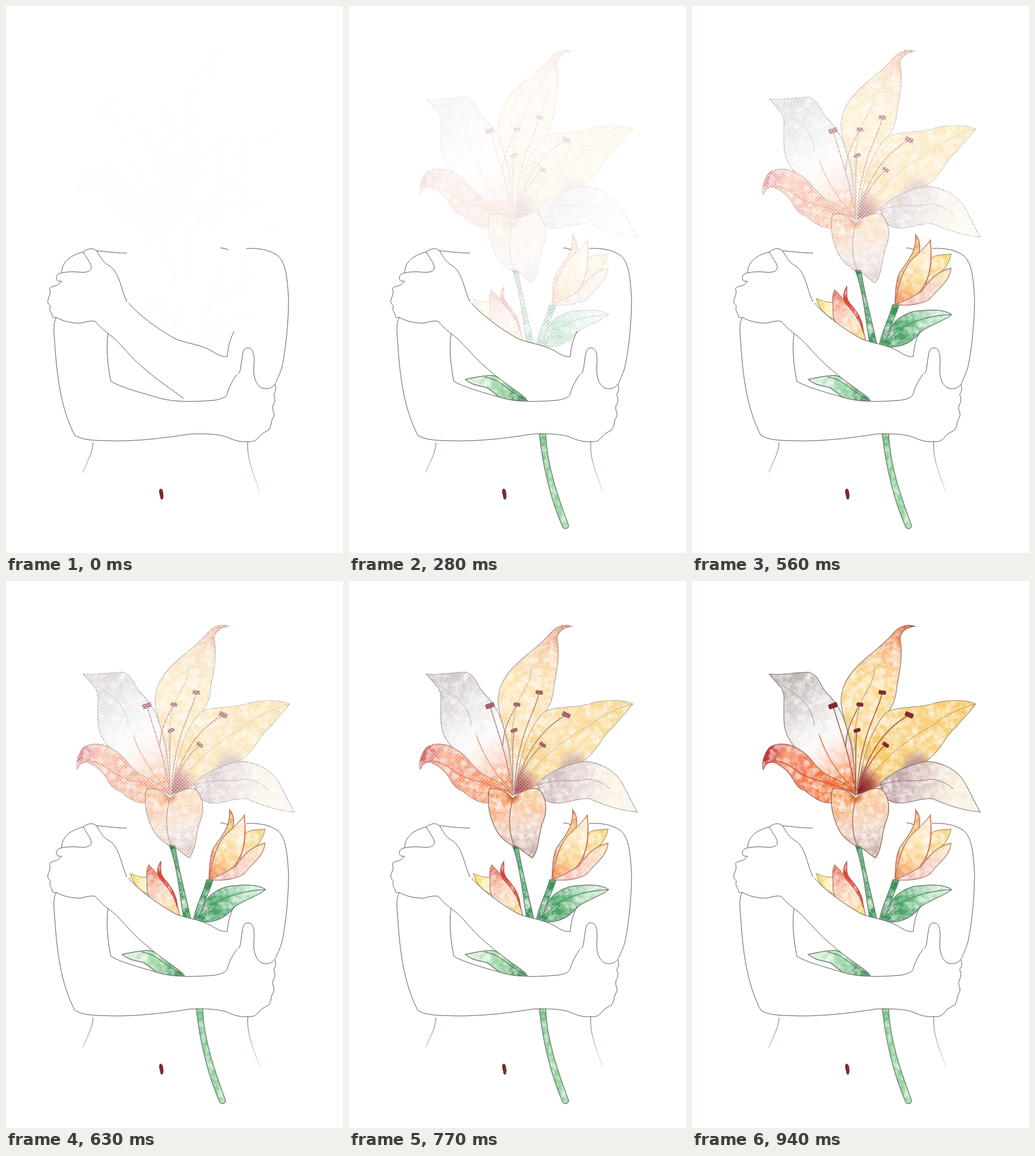
Animation, 588 px wide and 952 px high, one loop 1.64 s. Source, as an HTML page with a canvas:

```html
<!DOCTYPE html>
<html lang="en">
<head>
<meta charset="utf-8">
<title>Lily embrace</title>
<style>
html, body { margin: 0; width: 100%; height: 100%; overflow: hidden; background: #fff; }
canvas { display: block; }
</style>
</head>
<body>
<canvas id="stage" width="588" height="952"></canvas>
<script>
const W = 588, H = 952;
const ctx = document.getElementById('stage').getContext('2d');

function sheet(w = W, h = H) {
  const c = document.createElement('canvas');
  c.width = w;
  c.height = h;
  return c.getContext('2d');
}

let seed = 11;
const rnd = () => (seed = seed * 16807 % 2147483647) / 2147483647;

// Mottled watercolour: small translucent triangles
const mottle = sheet();
for (let i = 0; i < 9000; i++) {
  const x = 110 + rnd() * 405, y = 70 + rnd() * 850, r = 4 + rnd() * 6, a = rnd() * 6.3;
  mottle.fillStyle = rnd() < .7 ? 'rgba(255,255,255,.24)' : 'rgba(170,110,80,.025)';
  mottle.beginPath();
  for (let j = 0; j < 3; j++) mottle.lineTo(x + r * Math.cos(a + j * 2.1), y + r * Math.sin(a + j * 2.1));
  mottle.fill();
}

// Canvas weave that eats into half-faded paint
const weave = sheet(6, 6);
weave.fillRect(0, 0, 4, 2);
weave.fillRect(3, 3, 3, 2);
weave.fillRect(0, 3, 1, 2);
const grain = ctx.createPattern(weave.canvas, 'repeat');

function line(g, d, color, width = 1) {
  g.strokeStyle = color;
  g.lineWidth = width;
  g.stroke(new Path2D(d));
}

// axis: x1 y1 x2 y2 of the colour run
function shape(g, d, axis, colors, edge = '#8d8078', width = 1.3) {
  const p = new Path2D(d), run = g.createLinearGradient(...axis);
  colors.forEach((c, i) => run.addColorStop(i / (colors.length - 1), c));
  g.save();
  g.clip(p);
  g.fillStyle = run;
  g.fillRect(0, 0, W, H);
  g.drawImage(mottle.canvas, 0, 0);
  g.restore();
  line(g, d, edge, width);
}

function glow(g, d, x, y, r, color) {
  const run = g.createRadialGradient(x, y, 0, x, y, r);
  run.addColorStop(0, color);
  run.addColorStop(.45, color + 'b0');
  run.addColorStop(1, color + '00');
  g.save();
  g.clip(new Path2D(d));
  g.fillStyle = run;
  g.fillRect(x - r, y - r, 2 * r, 2 * r);
  g.restore();
}

const low = sheet(), mid = sheet(), base = sheet(), bloom = sheet();
const moss = '#6c8274';

// Lower stem and leaf
shape(low, 'M332 744L343 744C345 800 365 855 383 904C383 910 376 911 373 907C352 860 338 800 332 744Z',
  [335, 745, 380, 910], ['#6fbf80', '#92d49c', '#8ed09a'], '#7b9282', 1.8);
shape(low, 'M203 650C220 646 235 643 250 643C265 645 285 665 312 687L285 688C260 685 255 672 240 664C225 660 215 660 203 650Z',
  [203, 650, 312, 688], ['#e2f4e2', '#a0d9a8', '#1f8243'], moss, 1.6);
line(low, 'M237 646C263 649 275 668 310 687', '#4d8660', 1.4);

// Upper stems, right leaf and buds
shape(mid, 'M285 460L295 460C300 500 315 550 323 592L311 592C303 550 300 500 285 460Z',
  [290, 460, 316, 590], ['#1f8844', '#50a96c', '#3c9b5a'], moss, 1.5);
shape(mid, 'M350 520L361 521C354 545 340 565 338 592L327 590C331 565 344 545 350 520Z',
  [355, 520, 332, 590], ['#2f9150', '#45a563', '#3c9b5a'], moss, 1.5);
shape(mid, 'M453 537C440 527 410 528 385 532C360 540 345 555 345 570L330 592C360 597 380 590 400 566C420 553 440 548 453 537Z',
  [335, 590, 453, 535], ['#2a8f50', '#56ad72', '#a5d8b3', '#eef8ee'], moss, 1.5);
line(mid, 'M337 588C358 562 385 541 453 537', '#4d8b65', 1.3);

shape(mid, 'M452 432C440 433 425 432 416 440L408 487C430 470 448 455 452 432Z',
  [452, 432, 408, 485], ['#f8d468', '#fbdc92', '#f9cd8e'], '#a8936c');
shape(mid, 'M452 456C430 462 420 470 400 497L355 520C375 522 400 520 415 510C430 490 450 480 452 456Z',
  [452, 456, 370, 520], ['#fbe3a4', '#f8d6cb', '#f5b9b4'], '#a87d70');
shape(mid, 'M390 398C400 410 399 425 392 440C375 470 375 500 354 520C355 500 355 480 362 465C375 445 392 430 390 398Z',
  [390, 398, 358, 518], ['#f29a4e', '#fbd091', '#f2966c', '#e84a3a'], '#a96f55');
shape(mid, 'M416 407C418 440 420 470 398 497C385 508 365 515 354 520C360 490 365 465 380 445C395 430 408 420 416 407Z',
  [416, 407, 356, 520], ['#fbe8c6', '#fce8bd', '#fbd38a', '#f28c5c'], '#b0745c');
line(mid, 'M416 408C418 440 418 472 399 495', '#e0674f', 1.4);

shape(mid, 'M217 509C228 514 238 517 246 515L252 547C235 541 222 530 217 509Z',
  [217, 509, 250, 545], ['#f4d44c', '#fbeaa0', '#fbe3a0'], '#b3a25f');
shape(mid, 'M249 494C258 505 268 512 280 530C292 545 300 565 303 582L280 580C255 560 245 550 246 530C247 515 243 505 249 494Z',
  [249, 494, 295, 582], ['#ea6250', '#f8b8a0', '#fbdfc0', '#fad274'], '#a9745c');
shape(mid, 'M270 488C262 500 262 514 274 524C292 545 297 560 299 568C299 545 285 528 275 517C268 508 271 500 270 488Z',
  [270, 488, 298, 565], ['#e0352e', '#ea4a3a', '#e23c34'], '#a14d40', 1.1);

// Main petals
const tall = 'M389 79C378 74 362 78 352 90C335 112 305 130 285 152C266 173 260 190 260 212C262 235 272 260 280 290L286 372L288 372C300 290 325 250 340 230C350 220 356 205 358 180C364 150 368 125 363 100C364 88 375 80 389 79Z';
const right = 'M495 214C475 205 445 208 425 212C400 222 365 216 340 228C318 250 300 290 288 372L328 356C345 335 370 320 408 314C440 290 440 270 460 255C472 240 485 228 495 214Z';
const pale = 'M503 402C492 385 484 362 472 345C458 325 430 314 408 314C375 321 345 335 328 352C333 375 340 383 355 386C380 389 400 376 420 379C445 390 475 400 503 402Z';
const grey = 'M135 162C160 165 180 158 205 159C222 165 222 180 235 195C255 215 262 230 268 250C278 280 285 320 286 372C260 355 230 345 210 325C195 300 165 285 161 250C158 215 165 200 155 185C148 178 142 170 135 162Z';
const flame = 'M124 328C121 316 126 300 135 290C150 278 175 285 187 293C205 302 215 325 232 335C255 350 272 348 286 374C275 360 250 358 243 368L243 386C225 388 210 375 197 365C178 358 180 345 165 330C150 317 140 312 131 318C126 320 128 324 124 328Z';

shape(bloom, tall, [375, 78, 285, 340], ['#ea5a28', '#f8bf86', '#fbd78a', '#fbdb98', '#fad07a', '#f9d79a']);
line(bloom, 'M319 150C315 188 298 194 291 224C285 248 283 270 284 295', '#a89277');
shape(bloom, right, [495, 214, 290, 368], ['#f8c95e', '#fad078', '#fbd68a', '#f9c968', '#f7b870'], '#a1957b');
line(bloom, 'M495 214C465 222 440 235 425 248C390 268 335 300 298 362', '#a88f70');
glow(bloom, right, 292, 362, 44, '#87172a');
glow(bloom, right, 392, 324, 32, '#b08a88');
shape(bloom, pale, [335, 360, 500, 390], ['#b8979a', '#ccb4b2', '#e8d8ce', '#fcf3dd', '#f6f1ea']);
line(bloom, 'M330 355C360 343 390 351 415 345C430 345 445 352 456 362', '#8a7a74');
shape(bloom, grey, [160, 165, 272, 352], ['#bdb3b2', '#d0c9c9', '#e9e6e6', '#fcfafa', '#fbd5c5', '#f5722f'], '#85807c');
line(bloom, 'M156 181C188 200 207 214 214 251', '#8f8986');
line(bloom, 'M222 268C232 298 252 335 283 362', '#ef6e43', 1.6);
shape(bloom, flame, [126, 318, 284, 365], ['#c92a2e', '#f6ab88', '#f3825a', '#f5763f', '#f57a3c', '#f75514'], '#9a695b');
line(bloom, 'M126 322C140 305 163 316 180 328C205 350 245 348 284 371', '#db5641', 1.8);

// Stamens: filament plus boxy anther at x y, half its length, tilt
const stamens = [
  [246, 217, 8, -.35, 'C258 260 275 300 286 368'],
  [293, 215, 6, .15, 'C276 245 270 260 268 288'],
  [332, 194, 6.5, .12, 'C325 230 295 260 288 365'],
  [288, 260, 6, -.3, 'C284 290 286 320 286 365'],
  [379, 233, 7.5, .4, 'C340 255 310 290 290 362'],
  [338, 285, 6, .6, 'C320 300 300 330 291 362']
];
for (const [x, y, half, tilt, curve] of stamens) {
  line(bloom, `M${x} ${y}${curve}`, '#98534f', 1.5);
  bloom.save();
  bloom.translate(x, y);
  bloom.rotate(tilt);
  bloom.fillStyle = '#7f2934';
  bloom.beginPath();
  bloom.roundRect(-half, -half * .55, 2 * half, half * 1.1, 2);
  bloom.fill();
  bloom.restore();
}

// Drooping front petals
shape(base, 'M245 362C240 385 245 410 255 430C263 447 275 455 288 462L285 378C275 365 255 358 245 362Z',
  [258, 362, 280, 460], ['#f69a58', '#f8b080', '#f3cdb6', '#dcc2ba'], '#94786b', 1.5);
shape(base, 'M286 378C300 365 320 358 330 362C345 375 347 400 338 420C330 440 333 465 320 482C308 475 300 465 288 460C276 430 280 400 286 378Z',
  [305, 365, 314, 480], ['#fad29c', '#f9caa0', '#f3d5c4', '#dac2ba', '#b9a099'], '#94786b', 1.5);
glow(base, 'M270 365L286 378L305 367L300 390L275 390Z', 286, 374, 16, '#d75b24');

// Each layer: picture, steps until fully painted, curve of the fade
const layers = [[bloom, 12.4, 1.4], [mid, 7.8, 1.5], [low, 3.7, 1.2], [base, 10.6, 1.5]];
const scratch = sheet();

function paint([layer, span, power], step) {
  const a = Math.min(1, Math.max(.012, (step / span) ** power));
  if (a < 1) {
    scratch.globalCompositeOperation = 'copy';
    scratch.globalAlpha = 1;
    scratch.drawImage(layer.canvas, 0, 0);
    scratch.globalCompositeOperation = 'destination-out';
    scratch.globalAlpha = .9 * Math.sqrt(1 - a);
    scratch.fillStyle = grain;
    scratch.fillRect(0, 0, W, H);
  }
  ctx.globalAlpha = a;
  ctx.drawImage((a < 1 ? scratch : layer).canvas, 0, 0);
  ctx.globalAlpha = 1;
}

// Body
const arms = new Path2D('M214 517C230 537 270 566 297 580C318 588 340 589 360 601C370 607 377 611 386 610L387 671C386 680 380 683 365 686L387 690L385 749C370 745 350 744 320 744L200 757L183 653C200 664 240 674 270 683C285 687 300 688 313 687C290 668 265 652 240 630C213 608 200 585 178 570Z');
const outline = [
  'M211 430C190 430 175 427 158 426',
  'M97 464C98 443 115 433 135 428C143 421 153 421 158 426C168 443 172 448 182 453C199 466 201 495 211 515',
  'M214 517C230 537 270 566 297 580C318 588 340 589 360 601C370 607 377 611 386 610C388 592 390 582 398 566',
  'M135 428C138 436 149 447 149 456C147 464 136 464 126 463C112 462 100 463 92 466C86 470 87 478 92 479L97 479C93 484 90 486 86 487C79 489 74 489 77 497C78 502 72 510 73 516C75 522 79 520 77 524C75 530 81 535 81 541C83 543 87 543 88 542C100 549 115 552 130 552C142 549 150 547 156 549C164 559 172 565 178 570C200 585 213 608 240 630C265 652 290 668 310 683',
  'M88 542C81 553 84 570 86 600C89 640 95 700 120 747C135 757 160 756 190 757C240 757 290 750 320 745C350 744 370 745 385 750C400 757 410 759 422 758C432 759 437 756 441 750C448 742 456 740 459 737C464 728 462 722 466 717C471 708 463 705 466 695C472 685 468 680 467 676C473 668 470 662 469 658',
  'M178 570C174 595 178 630 183 653C200 664 240 674 270 683C300 691 340 688 365 686C380 683 386 680 387 671C391 660 396 650 403 641',
  'M405 640C411 635 409 625 412 612C413 600 416 595 422 595C431 595 433 605 433 620C430 645 436 660 447 665C457 668 466 664 469 658',
  'M419 422C440 421 458 424 472 433C490 445 491 480 493 510C493 550 488 600 481 630C478 640 473 650 470 657',
  'M374 421C380 421 383 423 388 424'
].join('');
const waist = ctx.createLinearGradient(0, 758, 0, 848);
waist.addColorStop(0, '#5c5846');
waist.addColorStop(1, '#e4dfc6');

function draw(step) {
  ctx.fillStyle = '#fff';
  ctx.fillRect(0, 0, W, H);
  for (const layer of layers) paint(layer, step);
  ctx.fillStyle = '#fff';
  ctx.fill(arms);
  line(ctx, outline, '#5a5753');
  line(ctx, 'M152 760C150 782 140 795 134 812M422 758C420 785 428 805 443 846', waist);
  const navel = 'M268 842C271 838 274 843 274 850C275 858 272 861 270 857C269 850 267 848 268 842Z';
  ctx.fillStyle = '#842828';
  ctx.fill(new Path2D(navel));
  line(ctx, navel, '#5c3030');
}

let shown = -1;
function tick(now) {
  const t = now % 1640;
  const step = t >= 940 ? 13 : Math.min(12, Math.floor(t / 70));
  if (step !== shown) draw(shown = step);
  requestAnimationFrame(tick);
}
draw(0);
requestAnimationFrame(tick);
</script>
</body>
</html>
```
